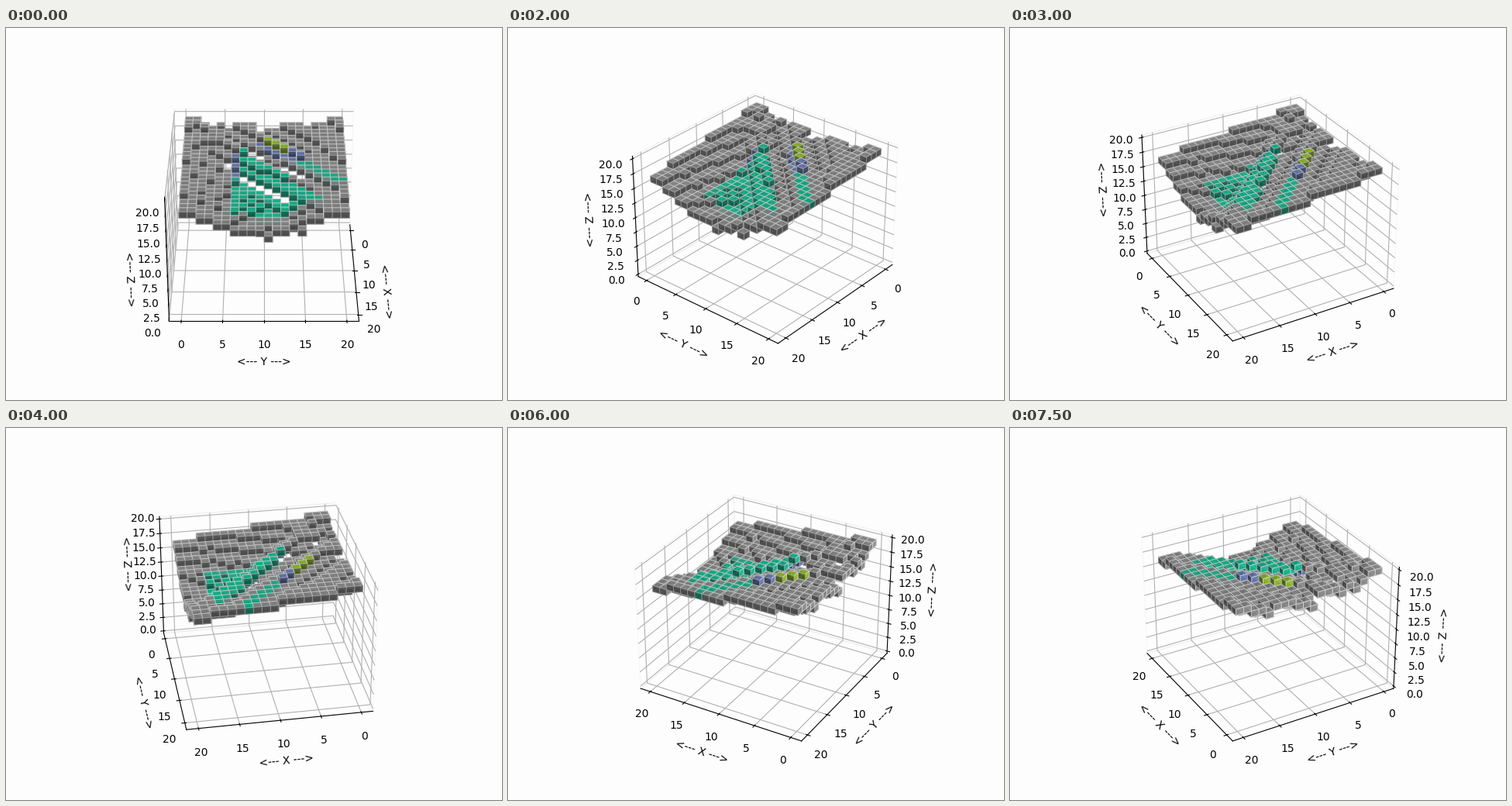
These frames come from a looping animation (640 by 480 pixels, 8 s). A matplotlib script:

```python
import numpy as np
import matplotlib.pyplot as plt
from matplotlib.animation import FuncAnimation
from mpl_toolkits.mplot3d.art3d import Poly3DCollection

N = 20
FRAMES, INTERVAL, STEP = 16, 500, 10
BACK = "#fdfdfd"
ALPHA = 0.8

GRAY = (0.63, 0.63, 0.63)
TEAL = (0.06, 0.86, 0.66)
BLUE = (0.47, 0.56, 0.84)
OLIVE = (0.66, 0.86, 0.16)

LIGHT = np.array([-2, -2, 1]) / 3
EDGE = (0.92, 0.92, 0.92)


def height(x, y):
    """Tilted plane with a trough along x, crossed by diagonal ridges."""
    slope = 20 - 0.13 * x
    trough = np.sin(np.pi * (y + 0.5) / N)
    phase = np.maximum(2 * np.pi * (y - 0.9 * x - 0.2) / 6.3, -np.pi)
    depth = np.where(phase < 0, 1.5, 0.95)
    ripple = 0.8 + depth * (1 - np.cos(phase))
    weave = 0.3 * (-1.0) ** (x + y)
    return np.rint(slope - trough * (ripple - weave)).astype(int)


def cell_color(x, y):
    band = y - x
    if band in (5, 6) and 4 <= x <= 13:
        if band == 6 and x <= 6:
            return OLIVE
        return BLUE if x <= 8 else TEAL
    if y >= 6 and 7 <= x <= 16 and band <= 0:
        return BLUE if y == 6 and x <= 9 else TEAL
    return GRAY


def cube_faces():
    """Every face that does not touch another cube, with its shaded colours."""
    tops = height(*np.indices((N, N)))
    filled = {(x, y, tops[x, y] - 1) for x in range(N) for y in range(N)}
    square = ((0, 0), (1, 0), (1, 1), (0, 1))
    polys, faces, edges = [], [], []
    for cell in sorted(filled):
        base = np.array(cell_color(*cell[:2]))
        for axis in range(3):
            for side in (0, 1):
                normal = np.zeros(3, int)
                normal[axis] = 2 * side - 1
                if tuple(np.add(cell, normal)) in filled:
                    continue
                quad = np.tile(np.array(cell, float), (4, 1))
                quad[:, axis] += side
                quad[:, [i for i in range(3) if i != axis]] += square
                shade = 0.3 + 0.35 * (normal @ LIGHT + 1)
                polys.append(quad)
                faces.append((*(base * shade), ALPHA))
                edges.append((*(np.array(EDGE) * (0.4 + 0.6 * shade)), 0.75))
    return polys, faces, edges


fig = plt.figure(figsize=(6.4, 4.8), dpi=100, facecolor=BACK)
ax = fig.add_subplot(projection="3d", facecolor=BACK)

polys, faces, edges = cube_faces()
ax.add_collection3d(Poly3DCollection(
    polys, facecolors=faces, edgecolors=edges, linewidths=0.7))

pad = 22 / 48
ax.set_xlim(-1 - pad, 21 + pad)
ax.set_ylim(-1 - pad, 21 + pad)
ax.set_zlim(-20 / 48, 20 + 20 / 48)
ax.set_xlabel("<--- X --->")
ax.set_ylabel("<--- Y --->")
ax.set_zlabel("<--- Z --->")
for axis in (ax.xaxis, ax.yaxis, ax.zaxis):
    axis.pane.fill = False


def update(i):
    ax.view_init(elev=30, azim=STEP * i)
    return []


anim = FuncAnimation(fig, update, frames=FRAMES, interval=INTERVAL,
                     init_func=lambda: update(0), repeat=True, repeat_delay=0)
plt.show()
```
